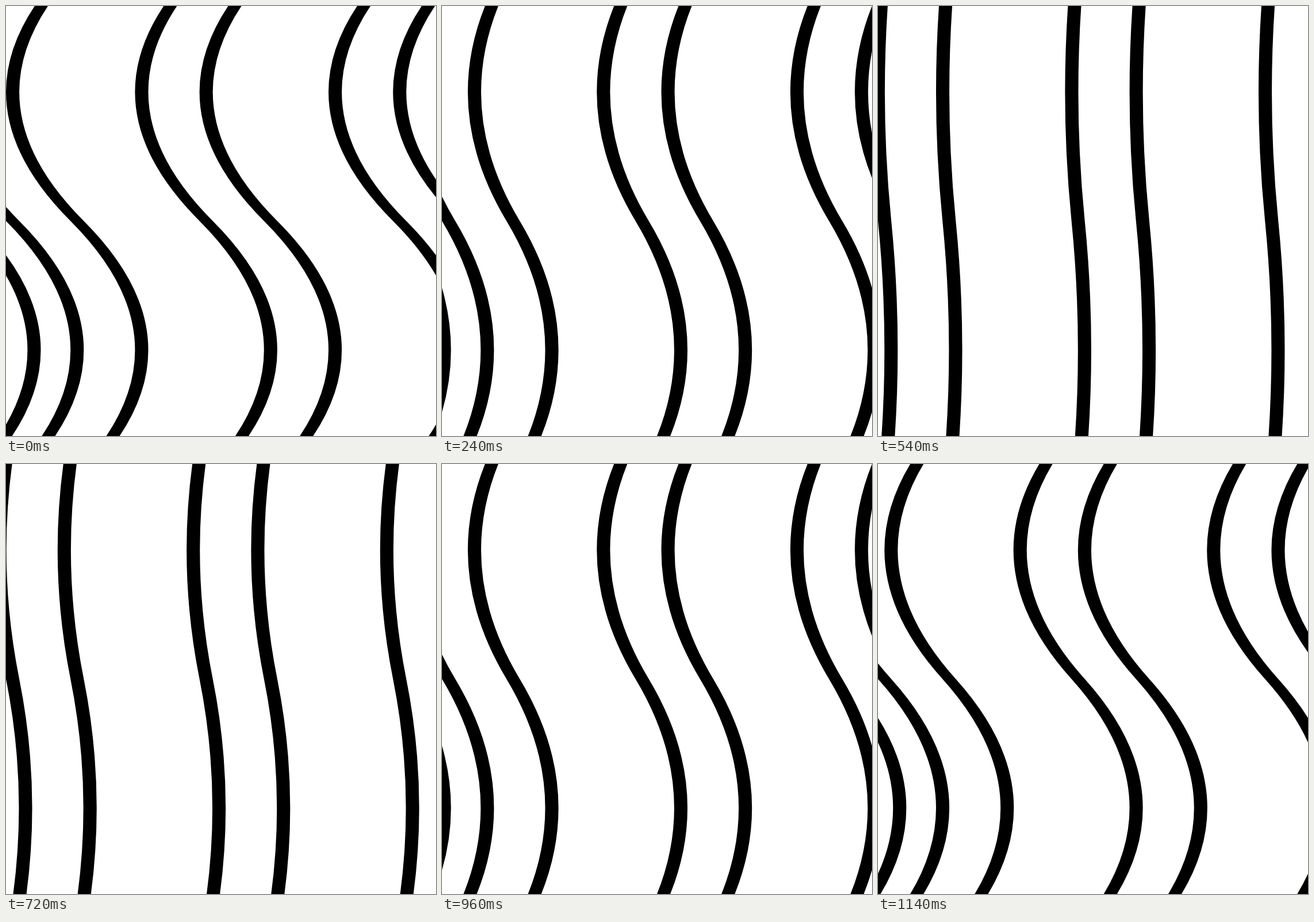
Write an HTML page that moves like this. It is 748x748 px and loops after 1.2 s.

```html
<!DOCTYPE html>
<html lang="en">
<head>
<meta charset="utf-8">
<title>Swaying bars</title>
<style>
  html, body { margin: 0; width: 100%; height: 100%; overflow: hidden; background: #fff; }
  svg { display: block; width: 100%; height: 100%; }
</style>
</head>
<body>
<svg viewBox="0 0 748 748"><path id="bars" fill="#000"/></svg>
<script>
const LOOP = 1200, STEP = 60;
const UNIT = 37.4, BAR = 23.1;
const MAX_SWAY = 3 * UNIT;
const TOP = -2 * UNIT, MID = 10 * UNIT, BOTTOM = 22 * UNIT;
const lefts = [-2, 0, 3, 9, 12, 18, 21].map(n => n * UNIT);
const bars = document.getElementById('bars');

// Each edge is two parabolas bulging left, then right; bars keep their horizontal width.
function barPath(x, sway) {
  const r = x + BAR, pull = 2 * sway;
  const upper = (TOP + MID) / 2, lower = (MID + BOTTOM) / 2;
  return `M${x} ${TOP}Q${x - pull} ${upper} ${x} ${MID}Q${x + pull} ${lower} ${x} ${BOTTOM}` +
    `H${r}Q${r + pull} ${lower} ${r} ${MID}Q${r - pull} ${upper} ${r} ${TOP}Z`;
}

function draw(ms) {
  const t = Math.floor((ms % LOOP) / STEP) * STEP;
  const sway = MAX_SWAY * Math.abs(1 - 2 * t / LOOP);
  bars.setAttribute('d', lefts.map(x => barPath(x, sway)).join(''));
}

let start;
function tick(now) {
  start ??= now;
  draw(now - start);
  requestAnimationFrame(tick);
}
draw(0);
requestAnimationFrame(tick);
</script>
</body>
</html>
```
